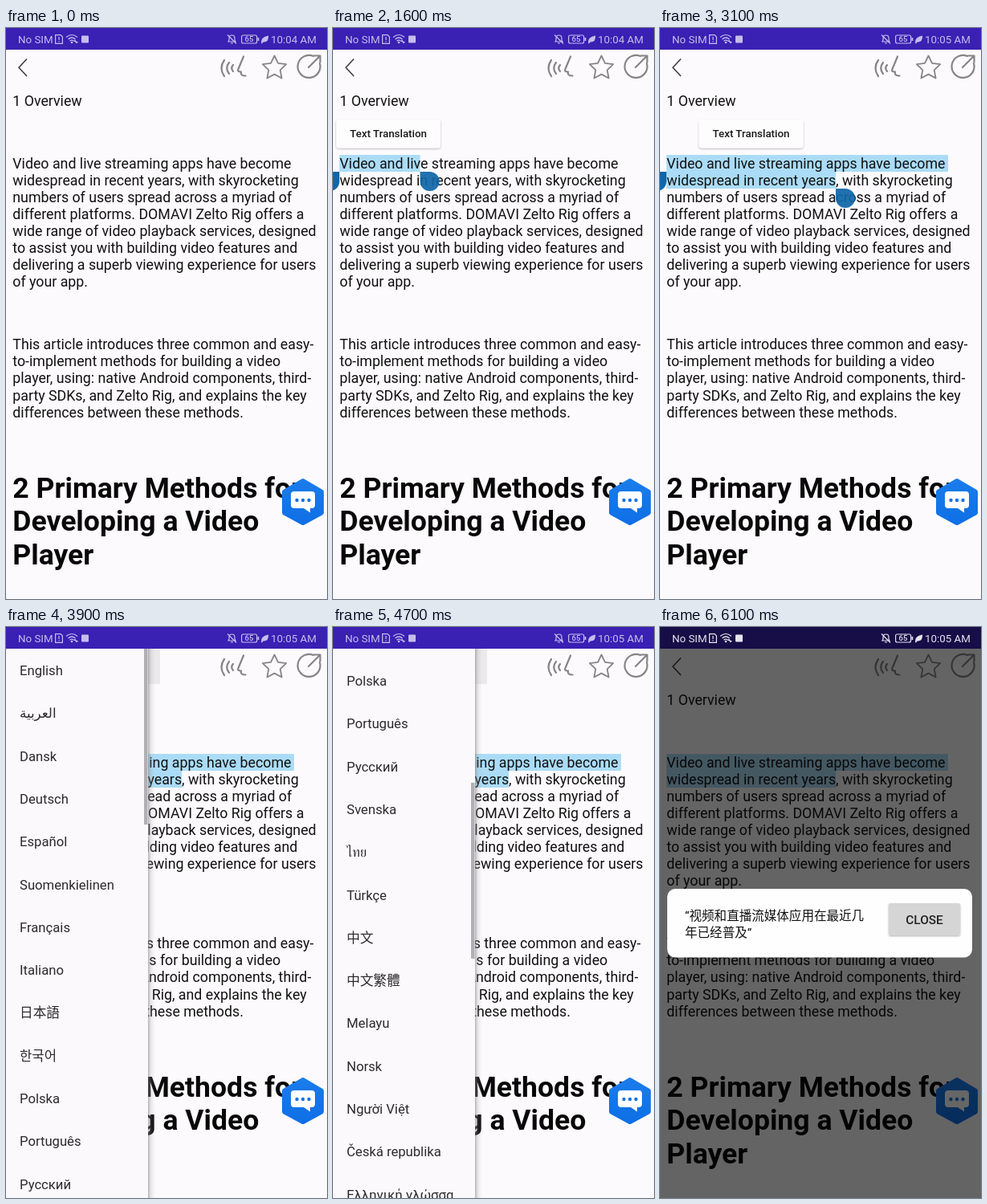
Recreate the animation shown at these times as an HTML page. Size 400 by 711 pixels, loop 6200 ms.

```html
<!DOCTYPE html>
<html lang="en">
<head>
<meta charset="utf-8">
<title>Text translation</title>
<style>
  html, body { margin: 0; width: 100%; height: 100%; overflow: hidden; background: #fdfafd; }
  svg { display: block; width: 400px; height: 711px; font-family: Roboto, "Noto Sans", "Noto Sans CJK SC", "Noto Sans CJK", sans-serif; }
  text { white-space: pre; }
  .body { font-size: 17.78px; fill: #111; }
  .head { font-size: 35.56px; font-weight: 700; fill: #080808; }
  .item { font-size: 16.67px; fill: #2b2a2c; }
  .line { fill: none; stroke: #858487; stroke-width: 2.2; stroke-linecap: round; stroke-linejoin: round; }
  .thin { fill: none; stroke: currentColor; stroke-width: 1.2; }
  .handle { fill: #0f66a8; }
</style>
</head>
<body>
<svg viewBox="0 0 400 711" xmlns="http://www.w3.org/2000/svg">
  <defs>
    <linearGradient id="shade">
      <stop offset="0" stop-color="#777" stop-opacity=".55"/>
      <stop offset=".4" stop-color="#999" stop-opacity=".2"/>
      <stop offset="1" stop-color="#aaa" stop-opacity="0"/>
    </linearGradient>
    <linearGradient id="blue" x2="0" y2="1">
      <stop offset="0" stop-color="#1a7ceb"/>
      <stop offset="1" stop-color="#0f6fe6"/>
    </linearGradient>
    <filter id="soft" x="-10%" y="-20%" width="120%" height="150%">
      <feDropShadow dx="0" dy="1" stdDeviation="1.2" flood-color="#000" flood-opacity=".3"/>
    </filter>
  </defs>

  <rect width="400" height="711" fill="#fdfafd"/>
  <g id="select" fill="#abdcf7">
    <rect id="row1" x="8" y="158" height="21"/>
    <rect id="row2" x="8" y="179" height="21"/>
  </g>
  <g id="page"></g>
  <g id="handles">
    <path class="handle" d="M8 179H-4A12 12 0 1 0 8 191Z"/>
    <path id="grip" class="handle" d="M0 0H12A12 12 0 1 1 0 12Z"/>
  </g>

  <path d="M26 38.5 16 49.3 26 60" fill="none" stroke="#3a393b" stroke-width="1.5"/>
  <g class="line">
    <path d="M272 40Q265 50 272 60M278 43Q272.500 50 278 57M283 46Q279.500 50 283 54"/>
    <path d="M296 35.500 289.500 51Q288 54 291.500 54.500H293Q291.500 59.500 298.500 59.500"/>
    <path id="star" stroke-width="1.8"/>
    <path d="M383 35A14 14 0 1 0 391 44M377 49 391 35M383.500 34.500H391.500V42.500"/>
  </g>

  <g id="popup">
    <rect x="-65" y="114" width="130" height="35.500" rx="3.500" fill="#fefdfe" filter="url(#soft)"/>
    <text y="136.300" text-anchor="middle" font-size="13.330" font-weight="500" fill="#1a1a1a">Text Translation</text>
  </g>

  <g>
    <path d="M370 564 393 577.500V603.500L370 616 347 603.500V577.500Z" fill="url(#blue)" stroke="url(#blue)" stroke-width="6" stroke-linejoin="round"/>
    <path d="M359 577H381Q385 577 385 581V594Q385 598 381 598H379V603.500L371 598H359Q355 598 355 594V581Q355 577 359 577Z" fill="#fff"/>
    <g fill="#1273e6"><circle cx="362.500" cy="588" r="2.200"/><circle cx="370" cy="588" r="2.200"/><circle cx="377.500" cy="588" r="2.200"/></g>
  </g>

  <g id="drawer">
    <rect x="177" y="27" width="15" height="44" fill="#77727a" opacity=".13"/>
    <rect x="177" y="27" width="9" height="684" fill="url(#shade)"/>
    <rect y="27" width="177" height="684" fill="#fcf9fc"/>
    <g id="list"></g>
    <rect id="thumb" x="172" y="27" width="4.500" height="219" fill="#b1afb4"/>
  </g>

  <rect width="400" height="27" fill="#3a20b3"/>
  <rect id="dim" width="400" height="711" fill="#000" opacity=".6"/>

  <g id="status" fill="currentColor" font-size="13.330">
    <text x="15" y="18.700">No SIM</text>
    <path class="thin" d="M61.600 8.600H68L70.400 11V19.400H61.600ZM66 11V15M66 16.200V17.600"/>
    <path class="thin" stroke-width="1.500" d="M75 11.500Q82 5.500 89 11.500M77.500 14Q82 10 86.500 14M79.500 16.300Q82 14 84.500 16.300"/>
    <circle cx="82" cy="18" r="1.300"/>
    <path d="M86 14.500 88 17H84ZM88 19.500 86 17H90Z"/>
    <rect x="94" y="9.500" width="9" height="9" rx="1"/>
    <path class="thin" d="M277 17H286L285 15V12.500Q285 9 281.500 9T278 12.500V15ZM280 19H283M276 8.500 287 19.500"/>
    <rect class="thin" x="293.600" y="9" width="19" height="10" rx="2"/>
    <rect x="313.500" y="12" width="1.800" height="4"/>
    <text x="303" y="17.400" font-size="9.500" font-weight="500" text-anchor="middle">65</text>
    <path d="M318 19Q317 11 327 9.500 327.500 18 320.500 17.500L319 19.500Z"/>
    <text id="clock" x="330" y="18.700"></text>
  </g>

  <g id="dialog">
    <rect x="9" y="326" width="380" height="85.500" rx="10" fill="#fefefe"/>
    <g lang="zh-CN" font-size="15.560" fill="#111">
      <text x="31" y="365">“视频和直播流媒体应用在最近几</text>
      <text x="31" y="385.500">年已经普及”</text>
    </g>
    <rect x="285" y="344" width="89" height="40" rx="2" fill="#d6d5d6" filter="url(#soft)"/>
    <text x="329.500" y="370" text-anchor="middle" font-size="15.400" font-weight="500" fill="#222">CLOSE</text>
  </g>
</svg>
<script>
const $ = id => document.getElementById(id);
const LOOP = 6200, STEP = 100, ROW = 53.3;

const blocks = [
  ['body', 97, 21.11, ['1 Overview']],
  ['body', 174.5, 21.11, [
    'Video and live streaming apps have become',
    'widespread in recent years, with skyrocketing',
    'numbers of users spread across a myriad of',
    'different platforms. DOMAVI Zelto Rig offers a',
    'wide range of video playback services, designed',
    'to assist you with building video features and',
    'delivering a superb viewing experience for users',
    'of your app.']],
  ['body', 400.2, 21.11, [
    'This article introduces three common and easy-',
    'to-implement methods for building a video',
    'player, using: native Android components, third-',
    'party SDKs, and Zelto Rig, and explains the key',
    'differences between these methods.']],
  ['head', 584.5, 41.7, ['2 Primary Methods for', 'Developing a Video', 'Player']]
];
const languages = ['English', 'العربية', 'Dansk', 'Deutsch', 'Español', 'Suomenkielinen',
  'Français', 'Italiano', '日本語', '한국어', 'Polska', 'Português', 'Русский', 'Svenska',
  'ไทย', 'Türkçe', '中文', '中文繁體', 'Melayu', 'Norsk', 'Người Việt',
  'Česká republika', 'Ελληνική γλώσσα'];

const label = (cls, x, y, s) => `<text class="${cls}" x="${x}" y="${y.toFixed(2)}">${s}</text>`;

$('page').innerHTML = blocks.map(([cls, y, gap, lines]) =>
  lines.map((s, i) => label(cls, 8.3, y + i * gap, s)).join('')).join('');
$('list').innerHTML = languages.map((s, i) => label('item', 17, 60 + i * ROW, s)).join('');

const starPoints = Array.from({ length: 10 }, (_, i) => {
  const a = i * Math.PI / 5, r = i % 2 ? 7.6 : 15.5;
  return [334.5 + r * Math.sin(a), 50 - r * Math.cos(a)].map(v => v.toFixed(1)).join(' ');
});
$('star').setAttribute('d', 'M' + starPoints.join('L') + 'Z');

const smooth = p => p * p * (3 - 2 * p);

// Interpolates a table of [time, value] steps.
function track(steps, t) {
  let i = steps.findIndex(s => s[0] > t);
  if (i < 0) return steps[steps.length - 1][1];
  if (!i) return steps[0][1];
  const [t0, v0] = steps[i - 1], [t1, v1] = steps[i];
  return v0 + (v1 - v0) * smooth((t - t0) / (t1 - t0));
}

const END = [[1200, 53.5], [2200, 210], [2300, 210], [2500, 219]];
const SLIDE = [[3200, -195], [3500, 0], [4900, 0], [5200, -195]];
const SCROLL = [[3900, 0], [4600, 520]];

const show = (id, on) => $(id).style.display = on ? '' : 'none';
const move = (id, x, y) => $(id).setAttribute('transform', `translate(${x} ${y})`);

function render(t) {
  const end = track(END, t), second = end > 120, slide = track(SLIDE, t), scroll = track(SCROLL, t);
  const drawer = slide > -195, dark = t >= 5600;
  const active = t >= 900 && !drawer && !dark;

  show('select', t >= 900);
  $('row1').setAttribute('width', second ? 351 : end - 8);
  $('row2').setAttribute('width', second ? end - 8 : 0);

  show('handles', active);
  move('grip', end, second ? 200 : 179);
  $('grip').setAttribute('opacity', t < 1100 ? .7 : .93);

  show('popup', active && t >= 1300);
  move('popup', Math.max(69, (8 + end) / 2), 0);

  show('drawer', drawer);
  move('drawer', slide, 0);
  move('list', 0, -scroll);
  move('thumb', 0, scroll * .321);

  show('dim', dark);
  show('dialog', dark);
  $('status').style.color = dark ? '#e6e4ee' : '#c6bdec';
  $('clock').textContent = t < 3000 ? '10:04 AM' : '10:05 AM';
}

const start = performance.now();
function tick() {
  const t = (performance.now() - start) % LOOP;
  render(Math.floor(t / STEP) * STEP);
  requestAnimationFrame(tick);
}
tick();
</script>
</body>
</html>
```
